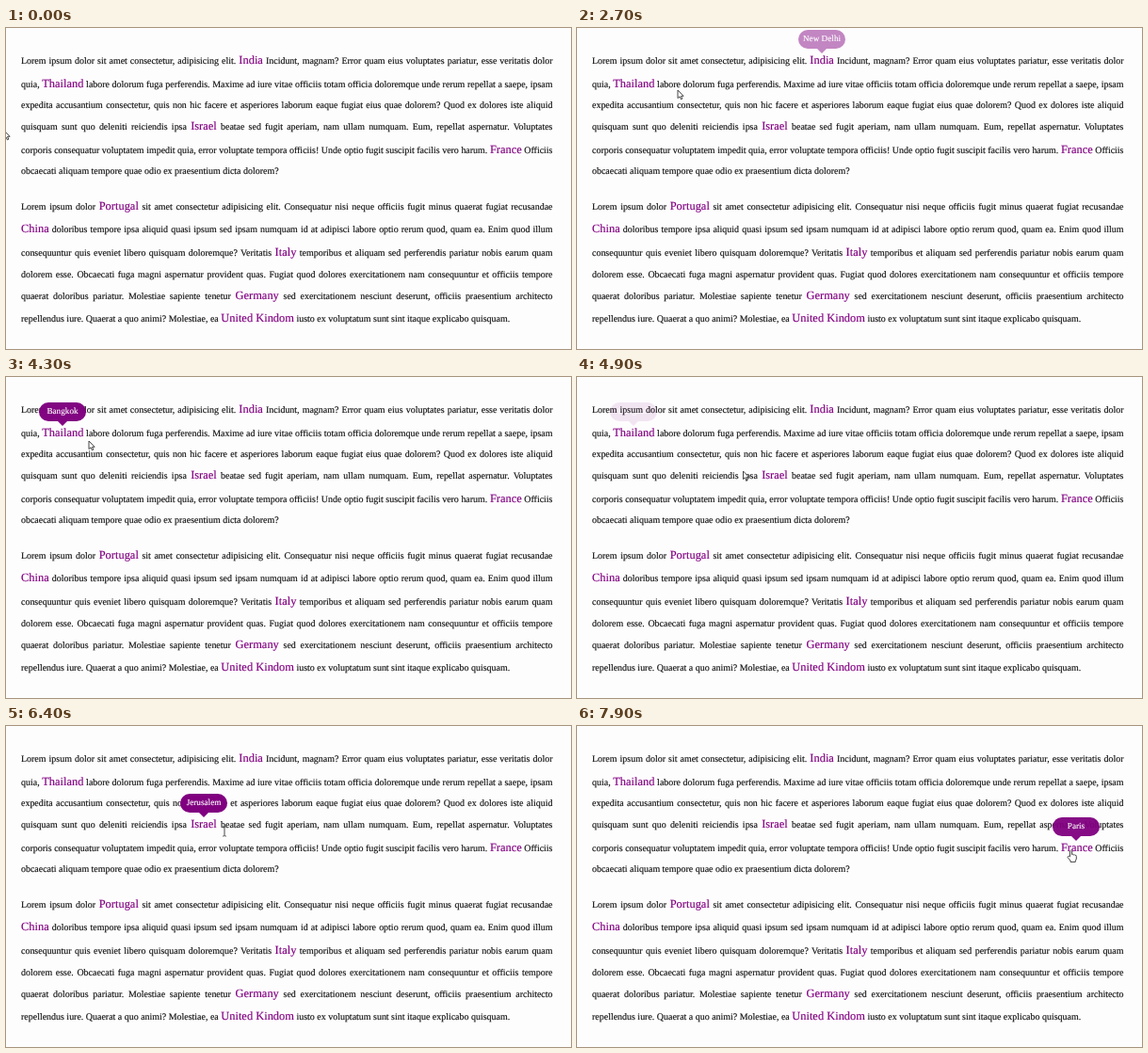
These frames come from a looping animation (600x341 px, 8000 ms). An HTML page:

```html
<!DOCTYPE html>
<html lang="en">
<head>
<meta charset="utf-8">
<title>Country tooltips</title>
<style>
html, body { margin: 0; width: 100%; height: 100%; overflow: hidden; background: #fefdfe; }
#stage {
  position: relative; width: 600px; height: 341px; overflow: hidden;
  font: 9.96px "Liberation Serif", "Times New Roman", serif;
  color: #111; text-rendering: geometricPrecision; -webkit-text-stroke: .15px;
}
.line {
  position: absolute; left: 16px; width: 564.5px; line-height: 24px;
  white-space: nowrap; text-align-last: justify;
}
.line.end { text-align-last: left; }
.line b { font-weight: 400; font-size: 12.45px; line-height: 0; color: purple; }
.tip {
  position: absolute; width: 50px; height: 20px; border-radius: 10px;
  background: purple; color: #fff; font-size: 9.2px; line-height: 19px; text-align: center;
}
.tip::after {
  content: ""; position: absolute; left: 20px; top: 19.5px;
  border: 5px solid transparent; border-top-color: purple; border-bottom: 0;
}
svg { position: absolute; left: 0; top: 0; overflow: visible; }
svg path { fill: #fff; stroke: #333; stroke-width: .9; stroke-linejoin: round; }
#text { fill: none; }
</style>
</head>
<body>
<div id="stage"></div>
<script>
const stage = document.getElementById('stage');

// Baseline and text of each line; *word* marks a country.
const lines = [
  [39, 'Lorem ipsum dolor sit amet consectetur, adipisicing elit. *India* Incidunt, magnam? Error quam eius voluptates pariatur, esse veritatis dolor'],
  [64, 'quia, *Thailand* labore dolorum fuga perferendis. Maxime ad iure vitae officiis totam officia doloremque unde rerum repellat a saepe, ipsam'],
  [86, 'expedita accusantium consectetur, quis non hic facere et asperiores laborum eaque fugiat eius quae dolorem? Quod ex dolores iste aliquid'],
  [109, 'quisquam sunt quo deleniti reiciendis ipsa *Israel* beatae sed fugit aperiam, nam ullam numquam. Eum, repellat aspernatur. Voluptates'],
  [134, 'corporis consequatur voluptatem impedit quia, error voluptate tempora officiis! Unde optio fugit suscipit facilis vero harum. *France* Officiis'],
  [156, 'obcaecati aliquam tempore quae odio ex praesentium dicta dolorem?', 'end'],
  [194, 'Lorem ipsum dolor *Portugal* sit amet consectetur adipisicing elit. Consequatur nisi neque officiis fugit minus quaerat fugiat recusandae'],
  [218, '*China* doloribus tempore ipsa aliquid quasi ipsum sed ipsam numquam id at adipisci labore optio rerum quod, quam ea. Enim quod illum'],
  [243, 'consequuntur quis eveniet libero quisquam doloremque? Veritatis *Italy* temporibus et aliquam sed perferendis pariatur nobis earum quam'],
  [266, 'dolorem esse. Obcaecati fuga magni aspernatur provident quas. Fugiat quod dolores exercitationem nam consequuntur et officiis tempore'],
  [289, 'quaerat doloribus pariatur. Molestiae sapiente tenetur *Germany* sed exercitationem nesciunt deserunt, officiis praesentium architecto'],
  [313, 'repellendus iure. Quaerat a quo animi? Molestiae, ea *United Kindom* iusto ex voluptatum sunt sint itaque explicabo quisquam.', 'end']
];

// Label, position, and the times the pointer enters and leaves.
const tips = [
  ['New Delhi', 235, 2, 1080, 2390],
  ['Bangkok', 35, 27, 2880, 4260],
  ['Jerusalem', 185, 72, 5080, 6420],
  ['Paris', 505, 97, 7180, 9000]
];

// Time, x, y and pointer shape.
const path = [
  [0, -2, 109, 'arrow'], [500, 4, 106, 'arrow'], [900, 74, 92, 'arrow'],
  [1100, 262, 37, 'hand'], [1500, 263, 34.5, 'hand'], [2300, 262, 36, 'hand'],
  [2400, 236, 43, 'arrow'], [2700, 107, 66, 'arrow'], [2900, 76, 60, 'hand'],
  [3200, 70, 59, 'hand'], [4100, 76, 60, 'hand'], [4300, 88, 68, 'arrow'],
  [4700, 140, 92, 'arrow'], [5100, 213, 108, 'hand'], [5500, 215.5, 109, 'hand'],
  [6300, 216, 108, 'hand'], [6400, 232, 112, 'text'], [7100, 515.5, 137, 'text'],
  [7200, 522, 133, 'hand'], [7900, 524.5, 132, 'hand'], [8000, 524.5, 132, 'hand']
];

const shapes = {
  arrow: 'M0 0V8.6L2 6.8 3.4 9.8 4.8 9.2 3.5 6.3H6.1Z',
  hand: 'M-1 6.8V1Q0-.8 1 1V4.5Q2.2 3.7 2.8 4.9 3.9 4.2 4.4 5.3 5.8 4.9 5.8 6.4V9Q5.6 10.3 4.8 11V12.4H-.5V11L-3.4 7.6Q-3.4 6-2 6.2Z',
  text: 'M-1.8-5H-.6L0-4.4.6-5H1.8M0-4.4V4.4M-1.8 5H-.6L0 4.4.6 5H1.8'
};

function add(cls, left, top, html) {
  const el = document.createElement('div');
  el.className = cls;
  el.style.left = left + 'px';
  el.style.top = top + 'px';
  el.innerHTML = html;
  return stage.appendChild(el);
}

for (const [y, text, end = ''] of lines)
  add('line ' + end, 16, y - 15, text.replace(/\*(.+?)\*/g, '<b>$1</b>'));
const tipEls = tips.map(([label, x, y]) => add('tip', x, y, label));
stage.insertAdjacentHTML('beforeend', '<svg width="1" height="1"><g id="pointer">' +
  Object.keys(shapes).map(k => `<path id="${k}" d="${shapes[k]}"/>`).join('') + '</g></svg>');
const pointer = document.getElementById('pointer');

// CSS "ease": cubic-bezier(.25, .1, .25, 1), solved by bisection.
function ease(x) {
  if (x <= 0) return 0;
  if (x >= 1) return 1;
  let lo = 0, hi = 1, u;
  for (let i = 0; i < 20; i++) {
    u = (lo + hi) / 2;
    if (.75 * u * (1 - u) + u ** 3 < x) lo = u; else hi = u;
  }
  return .3 * u * (1 - u) ** 2 + 3 * u * u * (1 - u) + u ** 3;
}

function draw(now) {
  const t = Math.floor(now % 8000 / 100) * 100;
  tips.forEach(([, , , enter, leave], i) => {
    tipEls[i].style.opacity = ease((t - enter) / 1000) - ease((t - leave) / 1000);
  });
  const i = path.findIndex(p => p[0] > t);
  const [t0, x0, y0, shape] = path[i - 1], [t1, x1, y1] = path[i];
  const k = (t - t0) / (t1 - t0);
  pointer.setAttribute('transform', `translate(${x0 + (x1 - x0) * k} ${y0 + (y1 - y0) * k})`);
  for (const el of pointer.children) el.style.display = el.id === shape ? '' : 'none';
}

const start = performance.now();
function loop() {
  draw(performance.now() - start);
  requestAnimationFrame(loop);
}
loop();
</script>
</body>
</html>
```
